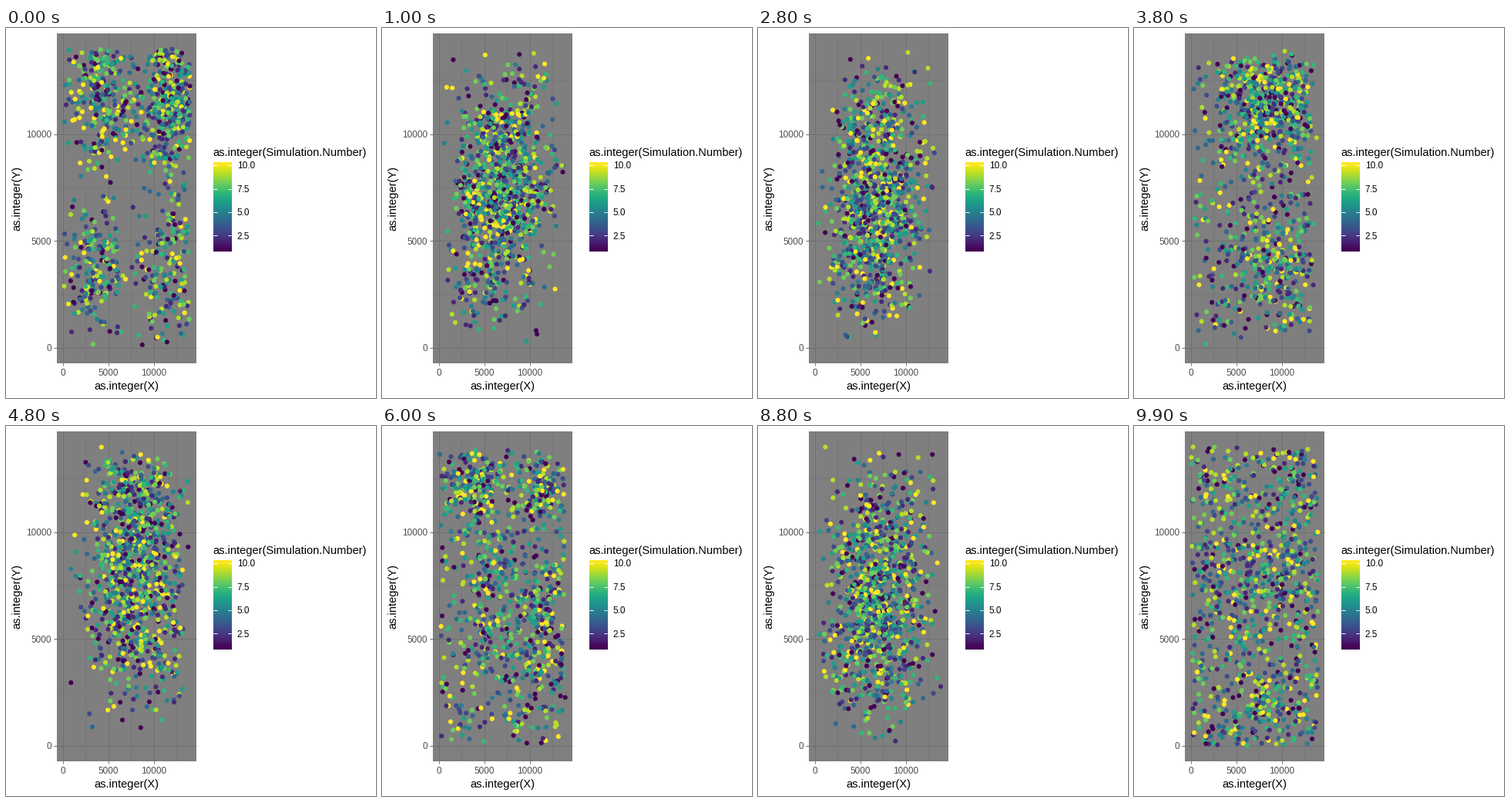
A matplotlib script that plays this animation: 480x480 px, repeating every 10 s.

```python
import matplotlib.pyplot as plt
import numpy as np
from matplotlib.animation import FuncAnimation
from matplotlib.patches import Rectangle

SIZE, DPI = 480, 96
FRAMES, INTERVAL = 100, 100
SPAN = 14000
COUNT = 1000
LEFT, RIGHT, TOP, BOTTOM = 65.8, 246.9, 7.33, 434.6
PX = 72 / DPI  # points per pixel

plt.rcParams["font.family"] = "Liberation Sans"
rng = np.random.default_rng(14)

# Each state: clusters of (x, y, spread x, spread y, share); the rest is uniform.
STATES = [
    [(4.2, 11.6, 1.9, 1.6, .25), (11.7, 11.6, 1.6, 1.7, .36),
     (3.6, 4.0, 1.6, 1.6, .17), (11.3, 4.0, 1.5, 1.8, .17)],
    [(4.0, 2.5, 3.0, 1.8, .35), (5.0, 8.0, 3.0, 2.2, .35)],
    [(8.5, 11.8, 3.0, 1.5, .48), (9.0, 4.0, 3.0, 1.8, .26)],
    [(4.0, 12.3, 1.8, .8, .14), (11.5, 12.2, 1.4, .8, .11),
     (6.5, 7.0, 2.0, 2.5, .18), (11.5, 5.0, 1.3, 2.0, .14)],
    [(2.0, 7.5, 1.2, 1.3, .06), (8.0, 10.5, 1.6, 1.3, .09),
     (6.5, 4.0, 2.0, 1.2, .10)],
    [(8.0, 8.3, 3.0, 1.0, .10), (7.7, 1.8, .8, .7, .04)],
]


def cloud(clusters):
    parts = [rng.normal((x, y), (sx, sy), (round(share * COUNT), 2))
             for x, y, sx, sy, share in clusters]
    pts = np.concatenate(parts) * 1000
    # reflect strays back into the square
    pts = SPAN - np.abs(SPAN - np.abs(pts))
    rest = rng.uniform(0, SPAN, (COUNT - len(pts), 2))
    return rng.permutation(np.concatenate([pts, rest]))


def px(x):
    return LEFT + (x / SPAN + .05) / 1.1 * (RIGHT - LEFT)


def py(y):
    return BOTTOM - (y / SPAN + .05) / 1.1 * (BOTTOM - TOP)


def label(x, y, text, size=11, color="black", **kw):
    ax.text(x, y, text, fontsize=size, color=color, va="baseline", **kw)


def line(xs, ys, color, width, z):
    ax.plot(xs, ys, color=color, lw=width * PX, zorder=z,
            solid_capstyle="butt")


fig = plt.figure(figsize=(SIZE / DPI, SIZE / DPI), dpi=DPI, facecolor="white")
ax = fig.add_axes([0, 0, 1, 1])
ax.axis("off")

# panel, grid and axes
ax.add_patch(Rectangle((LEFT, TOP), RIGHT - LEFT, BOTTOM - TOP,
                       fc="#7f7f7f", ec="none", zorder=0))
for v in (2500, 7500, 12500):
    line([px(v)] * 2, [TOP, BOTTOM], "#6b6b6b", .36, 1)
    line([LEFT, RIGHT], [py(v)] * 2, "#6b6b6b", .36, 1)
for v in (0, 5000, 10000):
    line([px(v)] * 2, [TOP, BOTTOM], "#6b6b6b", .71, 1)
    line([LEFT, RIGHT], [py(v)] * 2, "#6b6b6b", .71, 1)
    line([px(v)] * 2, [BOTTOM, BOTTOM + 3.67], "#333333", .71, 2)
    line([LEFT - 3.67, LEFT], [py(v)] * 2, "#333333", .71, 2)
    label(px(v), 450.6, str(v), 8.8, "#4d4d4d", ha="center")
    label(59.2, py(v) + 4.3, str(v), 8.8, "#4d4d4d", ha="right")
label((LEFT + RIGHT) / 2, 469, "as.integer(X)", ha="center")
label(18, (TOP + BOTTOM) / 2, "as.integer(Y)", ha="center", rotation=90,
      rotation_mode="anchor")

# colour bar of 20 blended bins
BAR_L, BAR_R, BAR_T, BAR_B = 269.3, 292.4, 175.3, 290.5
ax.imshow(np.linspace(10, 1, 20)[:, None], cmap="viridis", vmin=1, vmax=10,
          extent=(BAR_L, BAR_R, BAR_B, BAR_T), interpolation="bilinear",
          aspect="auto", zorder=2)
label(268.6, 166, "as.integer(Simulation.Number)")
bin_h = (BAR_B - BAR_T) / 20
for v in (2.5, 5.0, 7.5, 10.0):
    y = BAR_T + bin_h / 2 + (10 - v) / 9 * 19 * bin_h
    line([BAR_L, BAR_L + 4.6], [y, y], "white", 1, 3)
    line([BAR_R - 4.6, BAR_R], [y, y], "white", 1, 3)
    label(299.8, y + 4.2, f"{v:.1f}", 8.8)

# moving points
states = np.array([cloud(s) for s in STATES])
sims = rng.permutation(np.arange(COUNT) % 10 + 1)
dots = ax.scatter(np.zeros(COUNT), np.zeros(COUNT), c=sims, cmap="viridis",
                  vmin=1, vmax=10, s=(6.15 * PX) ** 2, lw=0, zorder=4)

ax.set_xlim(0, SIZE)
ax.set_ylim(SIZE, 0)


def update(frame):
    t = frame * (len(states) - 1) / (FRAMES - 1)
    i = min(int(t), len(states) - 2)
    pos = states[i] + (states[i + 1] - states[i]) * (t - i)
    dots.set_offsets(np.column_stack([px(pos[:, 0]), py(pos[:, 1])]))
    return dots,


anim = FuncAnimation(fig, update, frames=FRAMES, interval=INTERVAL,
                     repeat=True, repeat_delay=0)
plt.show()
```
